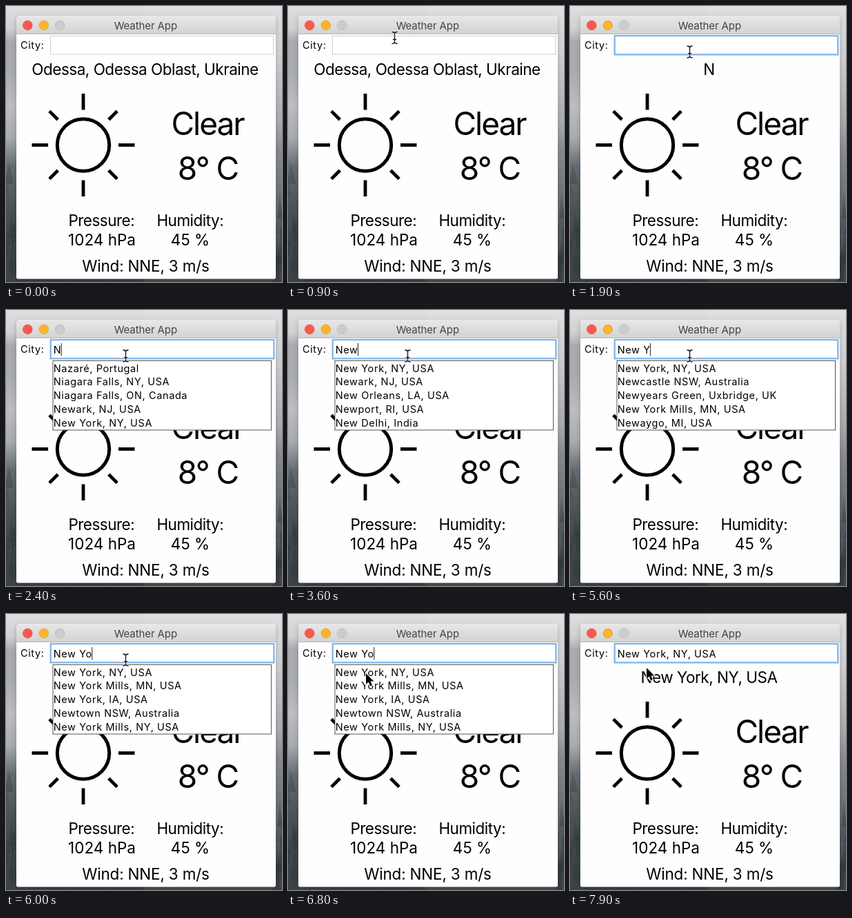
Recreate the animation shown at these times as an HTML page with a canvas. Size 400 by 400 pixels, loop 8000 ms.

```html
<!DOCTYPE html>
<html lang="en">
<head>
<meta charset="utf-8">
<title>Weather App</title>
<style>
html, body { margin: 0; width: 100%; height: 100%; overflow: hidden; background: #ccc; }
canvas { display: block; width: 400px; height: 400px; }
</style>
</head>
<body>
<canvas id="stage"></canvas>
<script>
const LOOP = 8000, STEP = 100;
const canvas = document.getElementById('stage');
const scale = window.devicePixelRatio || 1;
canvas.width = canvas.height = 400 * scale;
const ctx = canvas.getContext('2d');
const FONT = 'Inter, "Open Sans", sans-serif';

// [size, letter spacing]
const TITLE = [15, -0.1], SMALL = [14.5, 0.6], BODY = [22.5, -0.5], LOOSE = [22.5, 0], LARGE = [46, -2];

// Suggestions for each query
const lists = {
  'N': ['Nazaré, Portugal', 'Niagara Falls, NY, USA', 'Niagara Falls, ON, Canada', 'Newark, NJ, USA', 'New York, NY, USA'],
  'New': ['New York, NY, USA', 'Newark, NJ, USA', 'New Orleans, LA, USA', 'Newport, RI, USA', 'New Delhi, India'],
  'New Y': ['New York, NY, USA', 'Newcastle NSW, Australia', 'Newyears Green, Uxbridge, UK', 'New York Mills, MN, USA', 'Newaygo, MI, USA'],
  'New Yo': ['New York, NY, USA', 'New York Mills, MN, USA', 'New York, IA, USA', 'Newtown NSW, Australia', 'New York Mills, NY, USA']
};

// [start, entry text, headline, suggestions]
const states = [
  [0, '', 'Odessa, Odessa Oblast, Ukraine'],
  [1800, '', 'N'],
  [2400, 'N', 'N', 'N'],
  [2700, 'N', 'Ne'],
  [3300, 'New', 'New', 'New'],
  [4900, 'New', 'New '],
  [5200, 'New ', 'New ', 'New'],
  [5400, 'New ', 'New Y'],
  [5600, 'New Y', 'New Y', 'New Y'],
  [5700, 'New Y', 'New Yo'],
  [6000, 'New Yo', 'New Yo', 'New Yo'],
  [7000, 'New York, NY, USA', 'New York, NY, USA']
];

// Spans in which the text caret is lit
const caretOn = [[1000, 1800], [2100, 3000], [3600, 4200], [4500, 6200], [6500, 7000]];

// Pointer path: [time, x, y]
const path = [[100, 246, 306], [900, 154.5, 46], [1000, 154.5, 46], [1200, 173.5, 66.5],
  [6300, 173.5, 66.5], [6700, 113, 86], [6900, 113, 86], [7200, 111, 78], [8000, 111, 78]];

const FOCUS = 1000;
const latest = (rows, t) => rows.filter(r => r[0] <= t).pop();

function random(seed) {
  return () => (seed = (seed * 16807) % 2147483647) / 2147483647;
}

function text(str, x, y, [size, gap], align = 'left', color = '#000') {
  ctx.font = `${size}px ${FONT}`;
  ctx.letterSpacing = gap + 'px';
  ctx.fillStyle = color;
  ctx.textAlign = 'left';
  const w = ctx.measureText(str).width;
  ctx.fillText(str, align === 'center' ? x - w / 2 : x, y);
  return w;
}

function line(x1, y1, x2, y2, width, color) {
  ctx.beginPath();
  ctx.moveTo(x1, y1);
  ctx.lineTo(x2, y2);
  ctx.lineWidth = width;
  ctx.strokeStyle = color;
  ctx.stroke();
}

function disc(x, y, r, fill, edge) {
  ctx.beginPath();
  ctx.arc(x, y, r, 0, 7);
  ctx.fillStyle = fill;
  ctx.fill();
  ctx.lineWidth = 0.8;
  ctx.strokeStyle = edge;
  ctx.stroke();
}

function fade(x, y, w, h, stops) {
  const g = ctx.createLinearGradient(0, y, 0, y + h);
  stops.forEach(([at, color]) => g.addColorStop(at, color));
  ctx.fillStyle = g;
  ctx.fillRect(x, y, w, h);
}

function drawForest() {
  fade(0, 0, 200, 400, [[0, '#dfdfe0'], [0.08, '#d2d2d4'], [0.13, '#a9abaf'], [0.24, '#a8abaf'],
    [0.36, '#bcbec1'], [0.48, '#a6aaae'], [0.58, '#666d72'], [0.75, '#485054'], [1, '#3c4448']]);
  fade(200, 0, 200, 400, [[0, '#e0e0e1'], [0.16, '#d2d3d5'], [0.3, '#bcbec1'], [0.42, '#a9acb0'],
    [0.52, '#888d92'], [0.66, '#71777c'], [0.82, '#596065'], [1, '#485054']]);
  const rnd = random(77);
  for (let i = 0; i < 26; i++) {
    const left = i % 2 === 0;
    const x = left ? rnd() * 18 - 2 : 391 + rnd() * 10;
    const y = (left ? 225 : 260) + rnd() * 130;
    const h = 25 + rnd() * 35, w = 4 + rnd() * 4;
    ctx.fillStyle = `rgba(38,46,50,${0.08 + rnd() * 0.2})`;
    ctx.beginPath();
    ctx.moveTo(x, y);
    ctx.lineTo(x + w, y + h);
    ctx.lineTo(x - w, y + h);
    ctx.fill();
  }
}

function drawWindow() {
  ctx.save();
  ctx.shadowColor = 'rgba(0,0,0,.22)';
  ctx.shadowBlur = 7 * scale;
  ctx.shadowOffsetY = 2 * scale;
  ctx.fillStyle = '#fffeff';
  ctx.beginPath();
  ctx.roundRect(15, 14, 376, 381.4, [5, 5, 2, 2]);
  ctx.fill();
  ctx.restore();
  ctx.save();
  ctx.clip();
  fade(15, 14, 376, 27, [[0, '#e9e8e9'], [1, '#d3d2d3']]);
  ctx.fillStyle = '#b9b8b9';
  ctx.fillRect(15, 40, 376, 1);
  ctx.restore();
  disc(31.3, 28, 6.8, '#fb5850', '#e2463f');
  disc(54.8, 28, 6.8, '#f8b62d', '#dfa023');
  disc(78.2, 28, 6.8, '#cdcccd', '#b9b8b9');
  text('Weather App', 202.3, 33.5, TITLE, 'center', '#444');
}

function drawSun() {
  ctx.beginPath();
  ctx.arc(112, 201.5, 37.7, 0, 7);
  ctx.lineWidth = 5;
  ctx.strokeStyle = '#000';
  ctx.stroke();
  for (let i = 0; i < 8; i++) {
    const a = i * Math.PI / 4, c = Math.cos(a), s = Math.sin(a);
    const near = i % 2 ? 52 : 51, far = i % 2 ? 69.5 : 74.5;
    line(112 + c * near, 201.5 + s * near, 112 + c * far, 201.5 + s * far, 4.8, '#000');
  }
}

function drawReport(headline) {
  text(headline, 201.5, 100, BODY, 'center');
  drawSun();
  text('Clear', 292, 187, LARGE, 'center');
  text('8° C', 292.5, 252, LARGE, 'center');
  text('Pressure:', 138.3, 319, BODY, 'center');
  text('1024 hPa', 139, 347, LOOSE, 'center');
  text('Humidity:', 266.8, 319, BODY, 'center');
  text('45 %', 267, 347, LOOSE, 'center');
  text('Wind: NNE, 3 m/s', 202.5, 384.5, [22.5, -0.2], 'center');
}

function drawEntry(t, value) {
  text('City:', 21, 61.5, SMALL);
  ctx.fillStyle = '#fff';
  ctx.fillRect(65, 43, 323, 27);
  const focused = t >= FOCUS;
  ctx.lineWidth = focused ? 2.4 : 1;
  ctx.strokeStyle = focused ? '#82b8ee' : '#cfcecf';
  if (focused) ctx.strokeRect(64.7, 43.2, 323.6, 27.2);
  else ctx.strokeRect(64.5, 43.5, 323, 26.5);
  const w = text(value, 68.8, 62.5, SMALL);
  if (caretOn.some(([a, b]) => t >= a && t < b)) {
    const x = 68.7 + w;
    line(x, 48, x, 66.5, 1, '#222');
  }
}

function drawPopup(items) {
  ctx.fillStyle = '#fff';
  ctx.fillRect(68, 73.5, 316.5, 100.5);
  ctx.lineWidth = 1;
  ctx.strokeStyle = '#555';
  ctx.strokeRect(68, 73.5, 316.5, 100.5);
  items.forEach((item, i) => text(item, 68.8, 89.5 + i * 19.75, SMALL));
}

function drawBeam() {
  const shape = new Path2D('M-4 -8.5Q-.5 -8.5 0 -6.5Q.5 -8.5 4 -8.5M0 -6.5V6.5M-4 8.5Q-.5 8.5 0 6.5Q.5 8.5 4 8.5M-2.5 2.5H2.5');
  for (const [width, color] of [[3, 'rgba(255,255,255,.8)'], [1.3, '#111']]) {
    ctx.lineWidth = width;
    ctx.strokeStyle = color;
    ctx.stroke(shape);
  }
}

function drawArrow() {
  const shape = new Path2D('M0 0V16L3.7 12.6L6.2 18.4L9 17.2L6.5 11.5H11.3Z');
  ctx.lineWidth = 2;
  ctx.strokeStyle = '#fff';
  ctx.stroke(shape);
  ctx.fillStyle = '#000';
  ctx.fill(shape);
}

function drawPointer(t) {
  if (t < path[0][0]) return;
  const i = Math.max(1, path.findIndex(p => p[0] >= t));
  const [t0, x0, y0] = path[i - 1], [t1, x1, y1] = path[i];
  const k = (t - t0) / (t1 - t0), e = k * k * (3 - 2 * k);
  const x = x0 + (x1 - x0) * e, y = y0 + (y1 - y0) * e;
  ctx.save();
  ctx.translate(x, y);
  if (t < 6400 && y > 42 && y < 71) drawBeam();
  else drawArrow();
  ctx.restore();
}

function draw(now) {
  const t = Math.floor((now % LOOP) / STEP) * STEP;
  const [, value, headline, query] = latest(states, t);
  ctx.setTransform(scale, 0, 0, scale, 0, 0);
  drawForest();
  drawWindow();
  drawReport(headline);
  drawEntry(t, value);
  if (query) drawPopup(lists[query]);
  drawPointer(t);
}

const begin = performance.now();
function tick() {
  draw(performance.now() - begin);
  requestAnimationFrame(tick);
}
tick();
</script>
</body>
</html>
```
